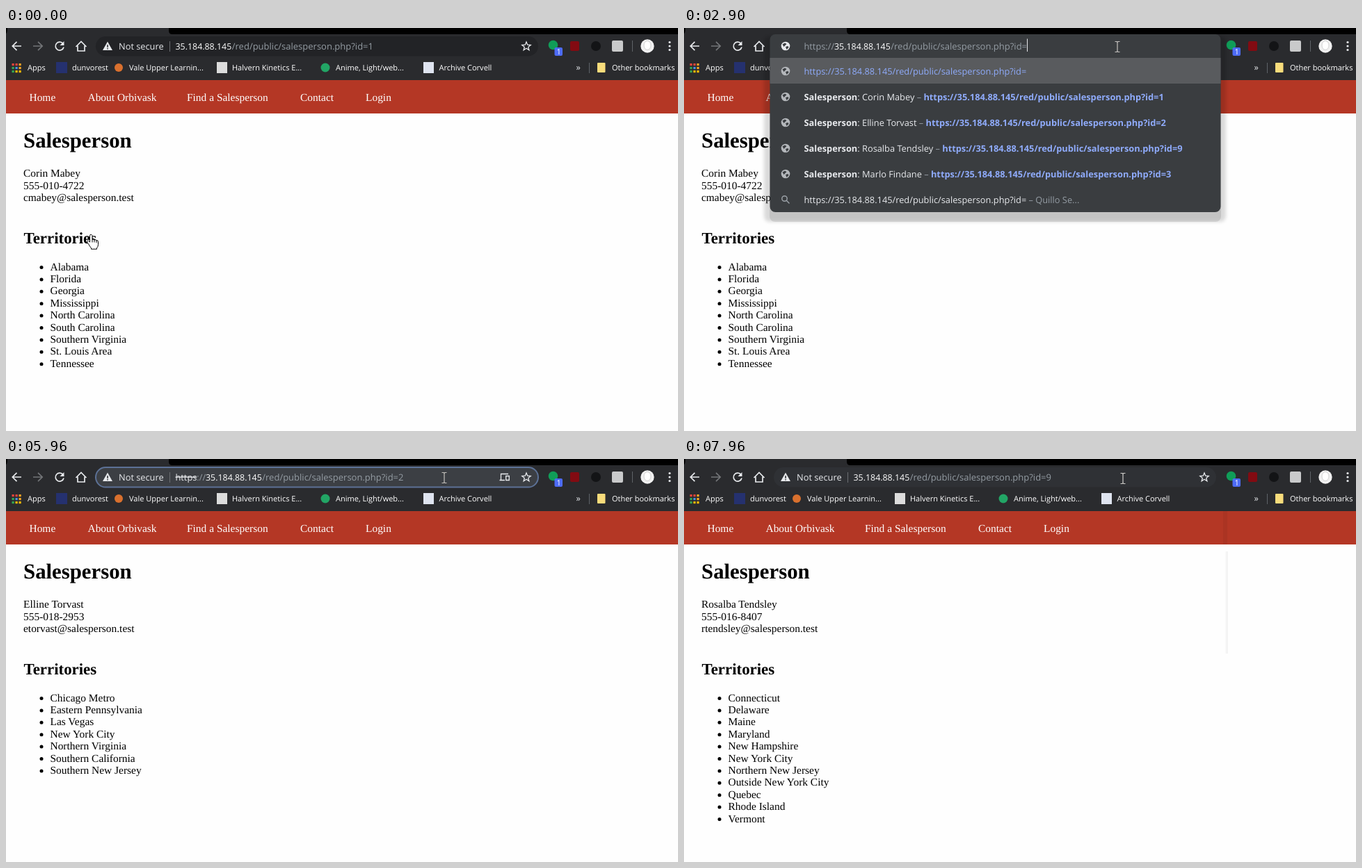
These frames come from a looping animation (966x580 px, 8 s). An HTML page:

```html
<!DOCTYPE html>
<html lang="en">
<head>
<meta charset="utf-8">
<title>Salesperson</title>
<style>
  html, body { margin: 0; width: 100%; height: 100%; overflow: hidden; background: #fefefe; }
  svg { display: block; width: 966px; height: 580px; }
  text { white-space: pre; text-rendering: geometricPrecision; }
  .ui { font: 12.8px "Open Sans", "Noto Sans", sans-serif; fill: #e8eaed; }
  .mark { font: 11px "Open Sans", "Noto Sans", sans-serif; fill: #fff; }
  .page { font: 15.45px "Liberation Serif", serif; fill: #000; }
  .ip { font-size: 12.4px; fill: #fff; }
  .path { font-size: 13px; }
  .dim { fill: #949ca3; }
  .strike { fill: #e8eaed; text-decoration: line-through; }
  .bold { font-weight: 700; }
  .link { fill: #8fabfb; }
  .nav { fill: #fff; }
  .h1 { font-size: 30.8px; font-weight: 700; }
  .h2 { font-size: 22.9px; font-weight: 700; }
  .line { fill: none; stroke: #e8eaed; stroke-width: 1.7; }
  .pointer { fill: #fff; stroke: #000; stroke-width: 1; }
  .beam { fill: none; stroke: #fff; stroke-width: 1.2; mix-blend-mode: difference; }
</style>
</head>
<body>
<svg viewBox="0 0 966 580">
  <defs>
    <filter id="soft" x="-10%" y="-20%" width="120%" height="150%"><feGaussianBlur stdDeviation="2.5"/></filter>
    <g id="globe"><circle r="6.3"/><path d="M-4.5-2.5 L-1-4.5 L1.500-3 L-1-.5 L-2.500 1z M0 1 L3.500 0 L4.500 2 L1.500 5z" fill="#3a3d40"/></g>
    <g id="search" fill="none" stroke="#9aa0a6" stroke-width="1.5"><circle cx="-1.5" cy="-1.5" r="3.7"/><path d="M1.3 1.3 L5.5 5.5"/></g>
  </defs>
  <rect width="966" height="580" fill="#fefefe"/>
  <rect width="966" height="12"/>
  <path d="M2 0 H234 V4 Q234 9 239 9 H966 V75 H0 V8 Q2 7 2 0z" fill="#2a2b2e"/>
  <rect y="75" width="966" height="48" fill="#b43725"/>
  <g id="pages"></g>
  <g id="toolbar"></g>
  <g id="address"></g>
  <g id="cursors"></g>
</svg>
<script>
const LOOP = 8000;
const el = id => document.getElementById(id);
const text = (x, y, body, cls) => `<text x="${x}" y="${y}" class="${cls}">${body}</text>`;
const span = (cls, body) => `<tspan class="${cls}">${body}</tspan>`;
const rect = (x, y, w, h, fill, r = 0) =>
  `<rect x="${x}" y="${y}" width="${w}" height="${h}" rx="${r}" fill="${fill}"/>`;
const dot = (x, y, r, fill) => `<circle cx="${x}" cy="${y}" r="${r}" fill="${fill}"/>`;
const stroke = (d, attrs = "") => `<path d="${d}" class="line" ${attrs}/>`;
// spans: "from-to from-to", in milliseconds
const during = (spans, body) => `<g data-on="${spans}">${body}</g>`;

// Page
const people = [
  { on: "0-4030", name: "Corin Mabey", phone: "555-010-4722", mail: "cmabey",
    areas: "Alabama,Florida,Georgia,Mississippi,North Carolina,South Carolina,Southern Virginia,St. Louis Area,Tennessee" },
  { on: "4030-7030", name: "Elline Torvast", phone: "555-018-2953", mail: "etorvast",
    areas: "Chicago Metro,Eastern Pennsylvania,Las Vegas,New York City,Northern Virginia,Southern California,Southern New Jersey" },
  { on: "7030-8000", name: "Rosalba Tendsley", phone: "555-016-8407", mail: "rtendsley",
    areas: "Connecticut,Delaware,Maine,Maryland,New Hampshire,New York City,Northern New Jersey,Outside New York City,Quebec,Rhode Island,Vermont" }
];
const nav = [[33.5, "Home"], [117.5, "About Orbivask"], [260, "Find a Salesperson"], [423, "Contact"], [517, "Login"]];

const person = p => during(p.on,
  [p.name, p.phone, p.mail + "@salesperson.test"].map((s, i) => text(25, 214.3 + i * 17.4, s, "page")).join("") +
  p.areas.split(",").map((s, i) => {
    const y = 348.5 + i * 17.4;
    return dot(51, y - 4, 2.5, "#000") + text(63.5, y, s, "page");
  }).join(""));

el("pages").innerHTML =
  nav.map(([x, s]) => text(x, 105.3, s, "page nav")).join("") +
  text(25, 172, "Salesperson", "page h1") + text(25.5, 309.7, "Territories", "page h2") +
  people.map(person).join("") +
  during("3760-4030 6480-7030", rect(111, 124, 1.5, 156, "#f4f4f4")) +
  during("3760-4030 6480-8000", rect(778.5, 133, 3.5, 147, "#f4f4f4") + rect(775, 75, 6, 48, "rgba(0,0,0,.05)"));

// Toolbar and bookmarks
const bookmarks = [
  [31, "Apps"], [95, "dunvorest"], [177, "Vale Upper Learnin..."], [325, "Halvern Kinetics E..."],
  [474, "Anime, Light/web..."], [622.5, "Archive Corvell"], [871, "Other bookmarks"]
];
const appColors = ["#e8453c", "#e8453c", "#f5a623", "#34a853", "#4a90e2", "#f5a623", "#34a853", "#fbbc05", "#fbbc05"];

el("toolbar").innerHTML =
  stroke("M22 26 H9.5 M15.5 19.8 L9.3 26 L15.5 32.2") +
  stroke("M39 26 H51.5 M46 19.8 L52.2 26 L46 32.2", 'style="stroke:#737578"') +
  during("0-3880 4030-6880 7030-8000", stroke("M82 22.5 A6 6 0 1 0 83 27.5") + '<path d="M83.5 19 V25 H77.5z" fill="#e8eaed"/>') +
  during("3880-4030 6880-7030", stroke("M71.5 20.5 L82.5 31.5 M82.5 20.5 L71.5 31.5")) +
  stroke("M100.5 27 L108 19.5 L115.5 27 M103 25.5 V33 H113 V25.5") +
  dot(786.5, 24.5, 6.8, "#109d58") + rect(788.5, 28, 11.5, 12, "#4d6bf5", 2) +
  text(791.6, 37.5, "1", "mark") +
  rect(811, 19, 13, 14, "#820b12", 2) + dot(848, 26, 7, "#131416") +
  rect(871, 18, 16, 16, "#c9cacb", 2) + rect(900, 18, 1, 16, "#5f6368") +
  dot(922, 26, 9.7, "#f1f1f1") + '<ellipse cx="922" cy="25" rx="5" ry="6.5" fill="#fff" stroke="#d0d0d0"/>' +
  [20.5, 26, 31.5].map(y => dot(954, y, 1.6, "#e8eaed")).join("") +
  appColors.map((c, i) => rect(8.5 + i % 3 * 5, 51 + Math.floor(i / 3) * 5, 3.2, 3.2, c)).join("") +
  rect(72, 49, 16, 16, "#25316f") + dot(162, 57, 6, "#d9702e") + rect(303, 49, 15, 16, "#dcdcdc") +
  dot(459, 57, 6.5, "#22a565") + rect(600, 49, 15, 16, "#dfe4f0") +
  rect(838, 50, 1, 15, "#5f6368") + rect(850, 50, 11.5, 14, "#f8dc7b", 1) +
  text(819.5, 61, "»", "ui") +
  bookmarks.map(([x, s]) => text(x, 61, s, "mark")).join("");

// Address bar
const host = "35.184.88.145";
const route = id => "/red/public/salesperson.php?id=" + id;
const fullUrl = id => "https://" + host + route(id);
const address = (x, id, cls = "dim") =>
  text(x, 30.8, host, "ui ip") + text(x + 81.3, 30.8, route(id), "ui path " + cls);
const scheme = (x, cls = "") =>
  text(x, 30.8, span(cls, "https") + "://", "ui dim");
const pill = (fill, edge = "none") =>
  `<rect x="129" y="12" width="636" height="28.5" rx="14.2" fill="${fill}" stroke="${edge}" stroke-width="2"/>`;
const caret = x => rect(x, 15.5, 1, 18.5, "#e8eaed");
const star = stroke("M748 20 L749.7 24.2 L754.2 24.5 L750.7 27.4 L751.9 31.8 L748 29.3 L744.1 31.8 L745.3 27.4 L741.8 24.5 L746.3 24.2z", 'style="stroke-width:1.3"');
const device = stroke("M722 21.5 H711.5 V30 M709.5 30.5 H717 M718.7 24.5 H723.3 V30.5 H718.7z", 'style="stroke-width:1.3"');
const divider = x => rect(x, 19, 1, 15, "#6b6e72");
const warning = '<path d="M146 19.5 L153 32 H139z" fill="#e8eaed"/>' + rect(145.3, 24, 1.5, 4, "#2a2b2e") + rect(145.3, 29, 1.5, 1.5, "#2a2b2e");
const notSecure = warning + text(162, 30.8, "Not secure", "ui");
const info = '<circle cx="146.500" cy="26" r="6" class="line" style="stroke-width:1.4"/>' + rect(145.8, 25, 1.5, 4.3, "#e8eaed") + rect(145.8, 22.5, 1.5, 1.6, "#e8eaed");

const rest = "#222326", lit = "#2f3135", focus = "#3c3f44", ring = "#5c7196";
const resting = (spans, id, fill = lit) =>
  during(spans, pill(fill) + notSecure + divider(235) + address(243.5, id) + star);
const selected = (spans, id) => during(spans,
  pill(focus, ring) + notSecure + divider(235) + rect(244, 15, 283, 22, "#0078d7") +
  address(243.5, id, "nav") + device + star);
const editing = (spans, id) => during(spans,
  pill(focus, ring) + notSecure + divider(235) + scheme(243.5, "strike") + address(287, id) + device + star);
const settling = (spans, id) => during(spans,
  pill(lit) + notSecure + address(235, id) + star);

const icon = (name, y) => `<use href="#${name}" x="146" y="${y}" fill="#b4b7bb"/>`;
const visit = (name, id) => ["globe", span("bold", "Salesperson") + `: ${name} ` + span("dim", "– ") + span("bold link", fullUrl(id))];
const lookup = id => ["search", fullUrl(id) + span("dim", " – Quillo Se...")];

function dropdown(id, rows) {
  const bottom = 43 + rows.length * 37;
  return `<g filter="url(#soft)" opacity=".14">${rect(115, 12, 664, bottom + 2, "#000", 8)}</g>` +
    rect(123, 60, 649, bottom - 46, "rgba(0,0,0,.1)", 8) +
    rect(123.5, 9, 648, bottom - 9, "#3a3d40", 8) + rect(123.5, 43, 648, 37, "#595b5e") +
    `<use href="#globe" x="146" y="26" fill="#e8eaed"/>` + scheme(172.5) + address(216, id) +
    rows.map(([kind, body], i) => icon(kind, 62 + i * 37) + text(172.5, 66.5 + i * 37, body, "ui")).join("");
}
const history = dropdown("", [
  ["globe", span("link", fullUrl(""))],
  visit(people[0].name, 1), visit(people[1].name, 2), visit(people[2].name, 9), visit("Marlo Findane", 3),
  lookup("")
]);
const match = (name, id) => dropdown(id, [visit(name, id), lookup(id)]);
const loading = (spans, id, ghost) => during(spans,
  pill(lit) + info + address(161.5, id) + device + star + `<g opacity=".06">${ghost}</g>`);

const second = match(people[1].name, 2), third = match(people[2].name, 9);
el("address").innerHTML =
  resting("0-850", 1, rest) + resting("850-1090", 1) + selected("1090-1510", 1) + editing("1510-2900", 1) +
  during("1510-2060 2620-2900 5410-5960", caret(572)) +
  during("2900-3760 6360-6480", history) + during("2900-3330 6360-6480", caret(493)) +
  during("3760-3880", second) + during("6480-6880", third) +
  during("3760-3880 6480-6880", caret(500)) +
  loading("3880-4030", 2, second) + settling("4030-4180", 2) +
  resting("4180-4990", 2) + selected("4990-5410", 2) + editing("5410-6360", 2) +
  loading("6880-7030", 9, third) + settling("7030-7150", 9) + resting("7150-8000", 9);

// Mouse pointer: start time, shape, x, y
const shapes = {
  hand: '<path class="pointer" d="M5 1.5 q2-1 3 1 v6 q2-1 3 .5 q2-1 3 .7 q2.500-.6 2.500 2 v4 q0 3-2 5 v1.500 h-8 v-1.500 q-2-2-4-6 q-1.500-2-2-3 q0-2 2-1.500 l2 2 v-9 q0-1 .5-1.700z M8 8.500 v4 M11 9 v3.500 M14 10 v3"/>',
  arrow: '<path class="pointer" d="M.5 .5 V16 L4 12.700 L6.500 18.300 L9 17.200 L6.600 11.800 H11.500z"/>',
  beam: '<path class="beam" d="M-3.500-7.500 H-1 L0-6.500 L1-7.500 H3.500 M0-6.500 V6.500 M-3.500 7.500 H-1 L0 6.500 L1 7.500 H3.500"/>'
};
const moves = [
  [0, "hand", 116, 296], [150, "beam", 125.5, 307], [300, "arrow", 250, 348], [420, "arrow", 442, 149],
  [570, "arrow", 552, 2], [850, "beam", 550, 26], [1240, "beam", 555, 27], [1360, "beam", 560.5, 26.5],
  [1760, "beam", 582.5, 27], [1910, "beam", 623, 27], [5110, "beam", 629, 27], [5260, "beam", 630, 27],
  [7960, "beam", 631, 28]
];
el("cursors").innerHTML = Object.entries(shapes).map(([k, s]) => `<g id="${k}" class="${k === "beam" ? k : ""}">${s}</g>`).join("");

// Playback
const parts = [...document.querySelectorAll("[data-on]")].map(node => ({
  node, spans: node.dataset.on.split(" ").map(s => s.split("-").map(Number))
}));
const start = performance.now();

function draw(now) {
  const t = Math.max(0, now - start) % LOOP;
  for (const { node, spans } of parts)
    node.style.display = spans.some(([from, to]) => t >= from && t < to) ? "" : "none";
  const [, shape, x, y] = moves.filter(m => m[0] <= t).pop();
  for (const name in shapes) el(name).style.display = name === shape ? "" : "none";
  el(shape).setAttribute("transform", `translate(${x} ${y})`);
  requestAnimationFrame(draw);
}
draw(start);
</script>
</body>
</html>
```
